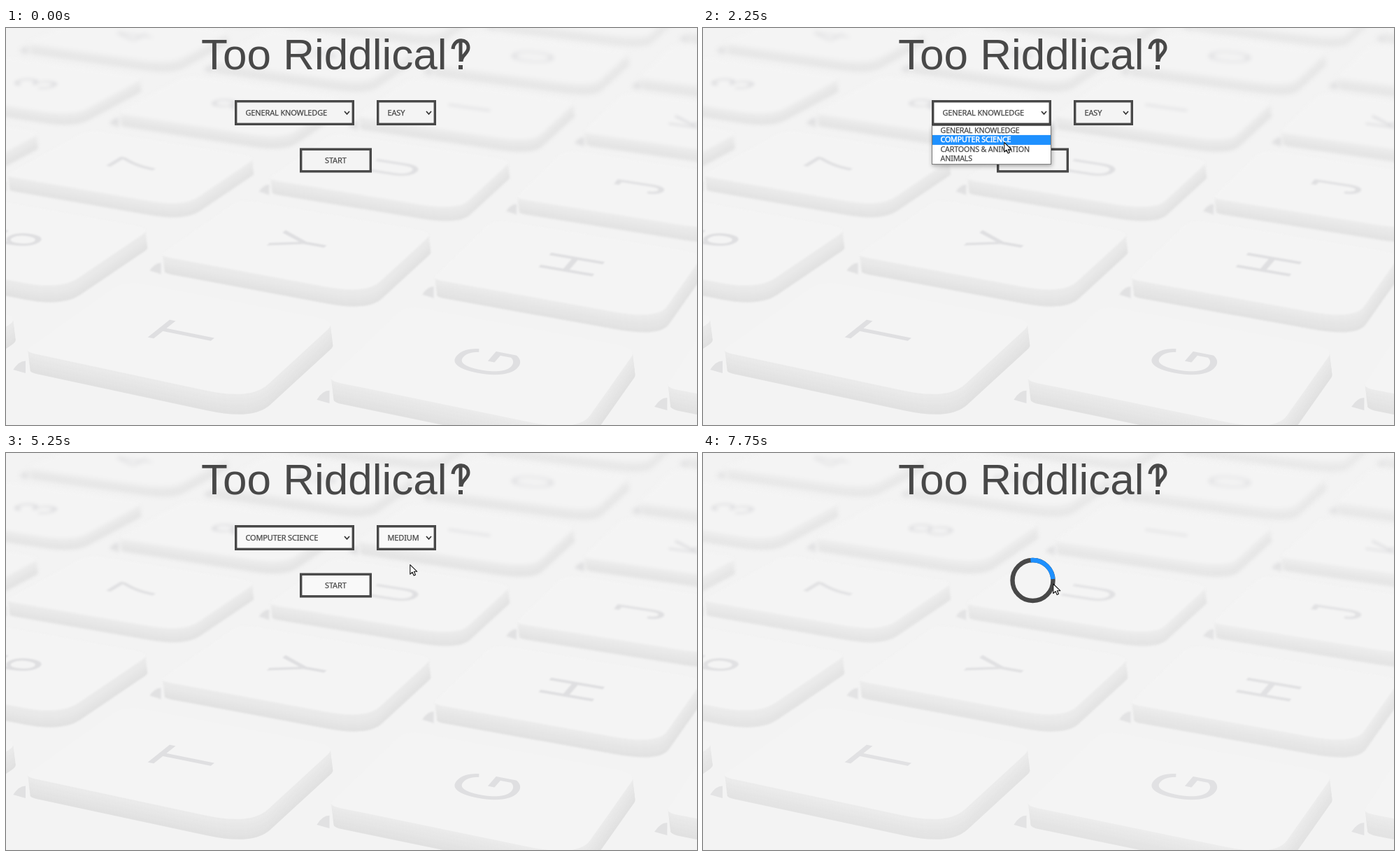
Animation, 988 px wide and 567 px high, one loop 8000 ms. Source, as an HTML page:

```html
<!DOCTYPE html>
<html lang="en">
<head>
<meta charset="utf-8">
<title>Quiz start screen</title>
<style>
  html, body { margin: 0; width: 100%; height: 100%; overflow: hidden; background: #f3f3f3; }
  svg { display: block; }
  .title { font: 62px "Liberation Sans", Arial, sans-serif; fill: #484848; }
  .legend { font: 30px "Liberation Sans", Arial, sans-serif; fill: #dfdfe1; text-anchor: middle; }
  .ui { font: 500 11px "Noto Sans", "Open Sans", sans-serif; letter-spacing: -.15px; }
  .option { font-size: 10.7px; }
  .menu { filter: drop-shadow(1px 2px 3px #0005); }
</style>
</head>
<body>
<svg width="988" height="567" viewBox="0 0 988 567">
  <rect width="988" height="567" fill="#f3f3f3"/>
  <g id="keyboard"></g>
  <text class="title" x="279" y="59">Too Riddlical</text>
  <g fill="none" stroke="#484848" stroke-width="5">
    <path d="M639 30C640 14 661 14 661 28C661 37 651 38 651 48M650 19V48"/>
    <path d="M650 53V59" stroke-width="6"/>
  </g>
  <g id="content"></g>
</svg>
<script>
const keyboard = document.getElementById('keyboard');
const content = document.getElementById('content');
const INK = '#484848', BLUE = '#1e90ff', PALE = '#f4f4f4';

// Perspective of the keyboard plane: u runs along a row, v across the rows.
const distance = (u, v) => 1 + .125 * u - .06 * v;
const project = (u, v) => [26 + 221 * u + 366 * v, 462 - 96 * u + 51 * v].map(n => n / distance(u, v));
const mix = (a, b, k) => a.map((n, i) => n + (b[i] - n) * k);

const KEY_U = .72, KEY_V = .837;
const ROUNDING = [.05, .2, .1, .1];

function facePath(u, v) {
  const corners = [project(u, v), project(u, v + KEY_V), project(u + KEY_U, v + KEY_V), project(u + KEY_U, v)];
  return corners.map((corner, i) => {
    const before = mix(corner, corners[(i + 3) % 4], ROUNDING[i]);
    const after = mix(corner, corners[(i + 1) % 4], ROUNDING[i]);
    return `${i ? 'L' : 'M'}${before}Q${corner} ${after}`;
  }).join('') + 'Z';
}

function legend(char, u, v) {
  const [x, y] = project(u, v), [ux, uy] = project(u + .01, v), [vx, vy] = project(u, v + .01);
  return `<text class="legend" y="10" transform="matrix(${[ux - x, uy - y, vx - x, vy - y, x, y]})">${char}</text>`;
}

function drawKey(char, u, v) {
  const path = facePath(u, v), far = distance(u + KEY_U / 2, v + KEY_V / 2);
  const depth = 30 / far ** 1.6, blur = .5 + 5 * Math.max(0, far - 1);
  const [x, y] = project(u, v), base = y + depth, reach = 16 / far;
  let side = '';
  for (let d = depth; d > 0; d -= 2) {
    const gray = 235 - 11 * d / depth + blur;
    side += `<path d="${path}" transform="translate(${d * .12} ${d})" fill="rgb(${gray},${gray},${gray})"/>`;
  }
  return `<g style="filter:blur(${blur}px)">
    <path d="M${x - reach} ${base - 3}Q${x - reach / 2} ${base - reach} ${x + 2} ${base - reach}V${base + 2}Z" fill="#e1e1e2"/>
    ${side}<path d="${path}" fill="${PALE}"/>${legend(char, u + .38, v + .42)}</g>`;
}

// Stagger and legends of each row, from the farthest to the nearest.
const rows = [[.4, '123456'], [-.47, '567890'], [0, 'TYUIOP'], [.25, 'GHJKL;'], [.7, 'BNM']];
keyboard.innerHTML = rows.map(([offset, chars], row) =>
  [...chars].map((char, i) => drawKey(char, offset + i, row - 2)).reverse().join('')).join('');

const label = (text, x, y, color = INK, extra = '', weight = .25) =>
  `<text class="ui ${extra}" x="${x}" y="${y}" fill="${color}" stroke="${color}" stroke-width="${weight}">${text}</text>`;

const box = ({ x, y, w, h }, fill, stroke = INK) =>
  `<rect x="${x + 1.7}" y="${y + 1.7}" width="${w - 3.4}" height="${h - 3.4}" fill="${fill}" stroke="${stroke}" stroke-width="3.4"/>`;

const ROW = 13.4, MENU_Y = 139.5;
const topic = {
  x: 327, y: 103, w: 171, h: 36, opens: 1250, closes: 3000,
  items: ['GENERAL KNOWLEDGE', 'COMPUTER SCIENCE', 'CARTOONS &amp; ANIMATION', 'ANIMALS']
};
const level = {
  x: 530, y: 103, w: 85, h: 36, opens: 4250, closes: 5250,
  items: ['EASY', 'MEDIUM', 'HARD']
};
const start = { x: 420, y: 171.5, w: 103, h: 35 };

const isOpen = (list, time) => time >= list.opens && time < list.closes;
const contains = ({ x, y, w, h }, [px, py]) => px >= x && px < x + w && py >= y && py < y + h;

function select(list, time, pointer) {
  const { x, w, items, opens, closes } = list;
  const lit = isOpen(list, time) || contains(list, pointer);
  const fill = lit ? '#fff' : time >= opens ? '#f9f9f9' : PALE;
  return box(list, fill) + label(items[+(time >= closes)], x + 15.5, 125) +
    `<path d="M${x + w - 14} 119l3.5 4l3.5-4" fill="none" stroke="#333" stroke-width="1.7"/>`;
}

function menu({ x, w, items }, [, py]) {
  const active = Math.max(0, Math.floor((py - MENU_Y) / ROW));
  return `<g class="menu"><rect x="${x + .5}" y="${MENU_Y}" width="${w - 1}" height="${items.length * ROW + 1.5}" fill="#fff" stroke="#777"/></g>
    <rect x="${x + 1}" y="${MENU_Y + active * ROW}" width="${w - 2}" height="14" fill="${BLUE}"/>` +
    items.map((text, i) => i == active
      ? label(text, x + 12.5, 150 + i * ROW, '#fff', 'option', .5)
      : label(text, x + 12.5, 150 + i * ROW, INK, 'option')).join('');
}

function button(pointer, time) {
  const hot = contains(start, pointer);
  const fill = hot ? '#44525f' : time >= topic.closes ? '#f9f9f9' : PALE;
  return box(start, fill, hot ? fill : INK) + label('START', 456, 192.5, hot ? '#fff' : INK);
}

const spinner = `<g fill="none" stroke-width="6.4"><circle cx="471.5" cy="182" r="29" stroke="${INK}"/>
  <path d="M468.5 153.2A29 29 0 0 1 500.4 180" stroke="${BLUE}"/></g>`;

const ARROW = 'M0 0V13.5L3.2 10.6L5.4 15.4L7.7 14.3L5.6 9.7H10Z';
const HAND = 'M-1.5 1Q0-.8 1.5 1V6.5Q3.2 5.6 4.2 7Q6 6.2 6.8 7.8Q9 7.3 9 9.5V13L7 18.5H-1.5L-5.5 12Q-6 9.5-3.8 10L-1.5 12Z';
const cursor = (shape, [x, y]) =>
  `<path transform="translate(${x + .8} ${y})" d="${shape}" fill="#fff" stroke="#111" stroke-width="1.1" stroke-linejoin="round"/>`;

// Pointer waypoints: time, x, y.
const route = [
  [250, 438, 459], [1000, 441, 118], [1250, 441, 118], [2000, 430, 170], [2500, 430, 157],
  [3250, 430, 157], [3500, 535, 159], [4000, 577, 124], [4250, 577, 124], [4750, 577, 160],
  [6000, 577, 159], [6500, 509, 188], [7000, 505, 188], [7500, 500, 187]
];

function pointerAt(time) {
  const next = route.findIndex(point => point[0] > time);
  if (next < 0) return route.at(-1).slice(1);
  if (next == 0) return [-99, -99];
  const a = route[next - 1], b = route[next];
  return mix(a, b, (time - a[0]) / (b[0] - a[0])).slice(1);
}

function render(time) {
  const pointer = pointerAt(time), loading = time >= 7750;
  const hand = !loading && [topic, level, start].some(area => contains(area, pointer));
  content.innerHTML = (loading ? spinner :
    select(topic, time, pointer) + select(level, time, pointer) + button(pointer, time) +
    [topic, level].filter(list => isOpen(list, time)).map(list => menu(list, pointer)).join('')) +
    cursor(hand ? HAND : ARROW, pointer);
  keyboard.setAttribute('opacity', time >= 7500 ? .9 : 1);
}

const TICK = 250;
let shown;
function draw() {
  const time = Math.floor(performance.now() % 8000 / TICK) * TICK;
  if (time !== shown) render(shown = time);
  requestAnimationFrame(draw);
}
draw();
</script>
</body>
</html>
```
